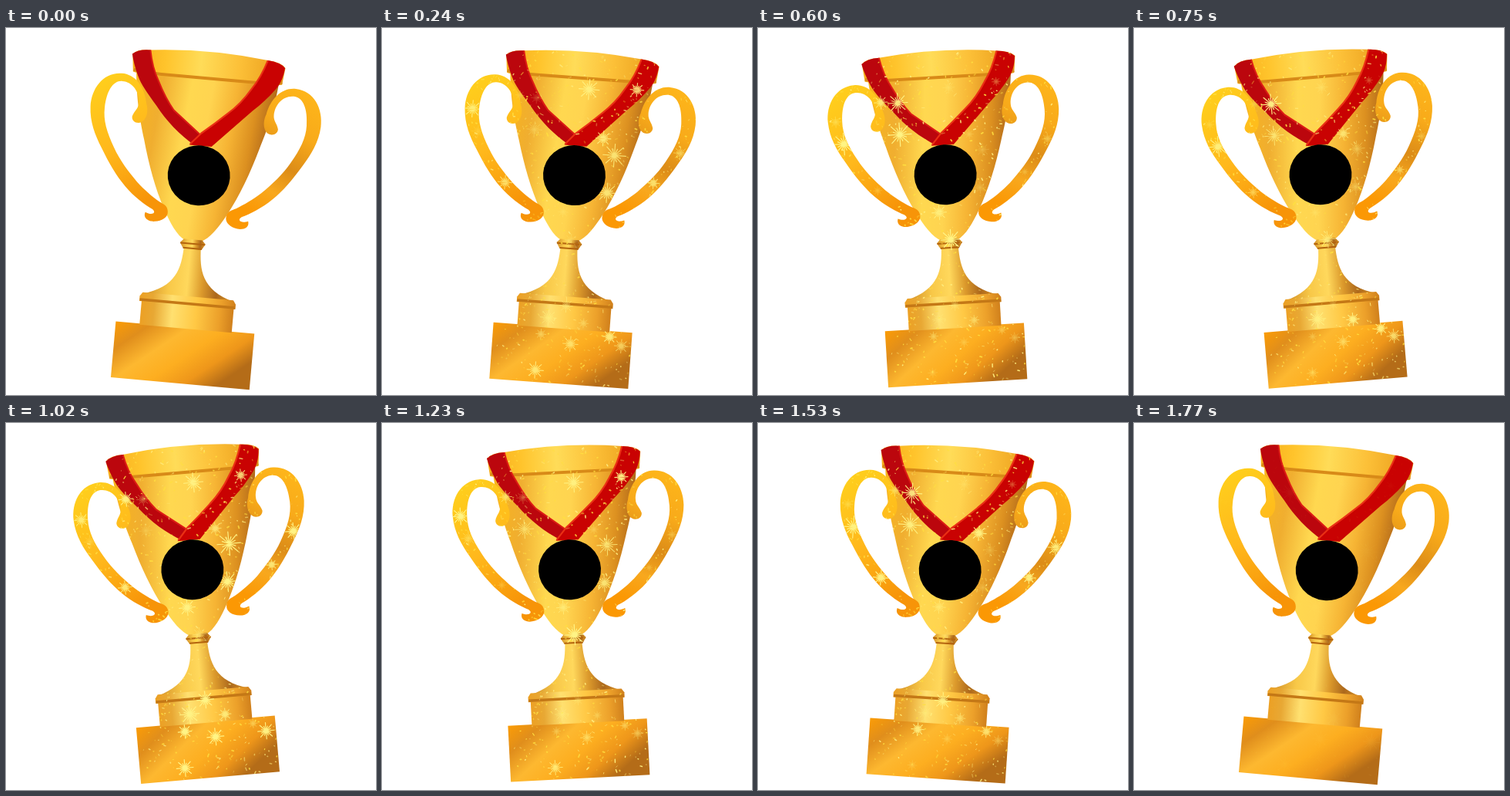
Animation, 480 px wide and 476 px high, one loop 1.8 s. Source, as an HTML page:

```html
<!DOCTYPE html>
<html lang="en">
<head>
<meta charset="utf-8">
<title>Trophy</title>
<style>
html, body { margin: 0; width: 100%; height: 100%; overflow: hidden; background: #fff; }
svg { display: block; width: 100%; height: 100%; }
</style>
</head>
<body>
<svg viewBox="0 0 480 476">
  <defs>
    <linearGradient id="cupFill" gradientTransform="rotate(6)">
      <stop offset="0" stop-color="#f8b41c"/>
      <stop offset=".2" stop-color="#f0ae30"/>
      <stop offset=".4" stop-color="#ffd850"/>
      <stop offset=".55" stop-color="#ffd450"/>
      <stop offset=".72" stop-color="#f6b434"/>
      <stop offset=".87" stop-color="#dc9020"/>
      <stop offset="1" stop-color="#b0681a"/>
    </linearGradient>
    <linearGradient id="rimFill">
      <stop offset="0" stop-color="#f6ac18"/>
      <stop offset=".22" stop-color="#ffc42c"/>
      <stop offset=".45" stop-color="#ffdc58"/>
      <stop offset=".7" stop-color="#fcc038"/>
      <stop offset="1" stop-color="#e89a18"/>
    </linearGradient>
    <linearGradient id="stemFill">
      <stop offset="0" stop-color="#d08c26"/>
      <stop offset=".28" stop-color="#f8c848"/>
      <stop offset=".48" stop-color="#ffd85c"/>
      <stop offset=".64" stop-color="#dc9a2c"/>
      <stop offset=".8" stop-color="#ac681c"/>
      <stop offset="1" stop-color="#e09a28"/>
    </linearGradient>
    <linearGradient id="blockFill">
      <stop offset="0" stop-color="#eca024"/>
      <stop offset=".14" stop-color="#e8a834"/>
      <stop offset=".34" stop-color="#ffe070"/>
      <stop offset=".6" stop-color="#ffc844"/>
      <stop offset=".85" stop-color="#eca02a"/>
      <stop offset="1" stop-color="#d0801c"/>
    </linearGradient>
    <linearGradient id="baseFill" x2="1" y2=".5">
      <stop offset="0" stop-color="#fb9c06"/>
      <stop offset=".2" stop-color="#e08e1c"/>
      <stop offset=".42" stop-color="#fdb830"/>
      <stop offset=".62" stop-color="#fdae20"/>
      <stop offset=".82" stop-color="#ee961a"/>
      <stop offset="1" stop-color="#b46c18"/>
    </linearGradient>
    <linearGradient id="leftFill" x2=".4" y2="1">
      <stop offset="0" stop-color="#ffd21c"/>
      <stop offset=".55" stop-color="#ffb81c"/>
      <stop offset="1" stop-color="#f79408"/>
    </linearGradient>
    <linearGradient id="rightFill" x2=".3" y2="1">
      <stop offset="0" stop-color="#ffb81a"/>
      <stop offset=".35" stop-color="#f8aa1a"/>
      <stop offset=".6" stop-color="#dc8c18"/>
      <stop offset=".8" stop-color="#f8a81e"/>
      <stop offset="1" stop-color="#fb9804"/>
    </linearGradient>
    <path id="handle" d="M162 129.5C172 128 174 114 170 104C166 82 152 67 134.5 67.5C111 68 97 90 98 114C99 134 107 150 117 166C129 186 139 200 152 213C164 225 180 235 190 239.5C196 244 190 248 181 244C178 253 188 256 194 255C204 254 211 248 210 241C209 233 204 232 198 229C188 223 178 216 167 206C154 193 142 180 133 164C122 145 116 130 116.5 114C117 92 124 78 136 77.5C150 77 160 90 160 104C160 112 155 114 153 122C153 127 157 130 162 129.5Z"/>
    <path id="cup" d="M153 60C156 98 163 124 171 150C180 182 191 212 205 238C215 256 224 270 236 276H256C268 270 277 256 287 238C301 212 312 182 321 150C329 124 336 98 339 60Z"/>
    <path id="rim" d="M146.5 41Q152 34 169 34Q246 25 322 34Q340 35 345.5 42L343 64Q330 67 305 66H186Q160 67 149 64Z"/>
    <path id="stem" d="M235 284C234 312 230 338 186 350H306C262 338 258 312 257 284Z"/>
    <path id="knob" d="M234 274H258L262.5 279L258 286.5H234L229.5 279Z"/>
    <path id="plate" d="M187 348H305L308.5 353V359.5H183.5V353Z"/>
    <path id="block" d="M186.5 358H306.5V390H186.5Z"/>
    <path id="base" d="M155.5 388.5H336V461.5H155.5Z"/>
    <path id="ribbonLeft" d="M146 41Q154 34 169 34C172 50 176 61 183 73C190 87 196 97 206 109L244 138L237 152C216 140 198 124 183 105C170 90 161 80 156 69Q149 54 146 41Z"/>
    <path id="ribbonRight" d="M322 34Q338 35 345 42C344 54 341 63 335 71C327 82 318 92 308 101L259 152H230L244 136C256 126 266 117 276 107.5C288 97 297 85 304 73Q315 57 322 34Z"/>
    <clipPath id="outline">
      <use href="#handle"/>
      <use href="#handle" transform="matrix(-1 0 0 1 496 0)"/>
      <use href="#cup"/><use href="#rim"/><use href="#stem"/><use href="#knob"/>
      <use href="#plate"/><use href="#block"/><use href="#base"/>
    </clipPath>
  </defs>
  <g id="trophy">
    <use href="#base" fill="url(#baseFill)"/>
    <use href="#block" fill="url(#blockFill)"/>
    <use href="#stem" fill="url(#stemFill)"/>
    <use href="#plate" fill="url(#blockFill)"/>
    <path d="M184 357.5H308" stroke="#c47816" stroke-width="3.5"/>
    <use href="#cup" fill="url(#cupFill)"/>
    <use href="#knob" fill="url(#stemFill)"/>
    <path d="M230 279.5H262M234 285.5H258" stroke="#b4640e" stroke-width="2"/>
    <use href="#rim" fill="url(#rimFill)"/>
    <path d="M149.5 61Q160 64 186 64H305Q330 64 343 61" fill="none" stroke="#d88a18" stroke-width="4"/>
    <use href="#handle" fill="url(#leftFill)"/>
    <use href="#handle" transform="matrix(-1 0 0 1 496 0)" fill="url(#rightFill)"/>
    <use href="#ribbonLeft" fill="#bb060d"/>
    <path d="M169 34C172 50 176 61 183 73C190 87 196 97 206 109L242 137" fill="none" stroke="#dc1c14" stroke-width="2"/>
    <use href="#ribbonRight" fill="#c90202"/>
    <path d="M322 34Q315 57 304 73C297 85 288 97 276 107.5C266 117 256 126 244 136L231 151" fill="none" stroke="#ea3014" stroke-width="2.2"/>
    <g clip-path="url(#outline)" stroke-linecap="round">
      <g id="glitter"></g>
      <g id="stars" stroke="#fff486"></g>
    </g>
    <ellipse cx="246" cy="190.5" rx="40.5" ry="39" fill="#000"/>
  </g>
</svg>
<script>
const LOOP = 1800, STEP = 30, SWING = 5.1;
const byId = id => document.getElementById(id);
const trophy = byId('trophy'), glitter = byId('glitter'), stars = byId('stars');

let seed = 17;
const random = () => (seed = (seed * 16807) % 2147483647) / 2147483647;

function addPath(parent, d, attrs) {
  const path = document.createElementNS('http://www.w3.org/2000/svg', 'path');
  path.setAttribute('d', d);
  for (const name in attrs) path.setAttribute(name, attrs[name]);
  return parent.appendChild(path);
}

// Tiny streaks, grouped so that each group twinkles together.
function speckPath(count) {
  let d = '';
  for (let i = 0; i < count; i++) {
    const x = 95 + random() * 305, y = 30 + random() * 432;
    const angle = random() * Math.PI, size = 0.4 + random() * random() * 4;
    d += `M${x.toFixed(1)} ${y.toFixed(1)}l${(Math.cos(angle) * size).toFixed(1)} ${(Math.sin(angle) * size).toFixed(1)}`;
  }
  return d;
}
const specks = Array.from({ length: 8 }, (_, i) => addPath(glitter, speckPath(150), {
  stroke: i % 2 ? '#ffe040' : '#ffee80', 'stroke-width': 0.9 + (i % 4) * 0.3
}));

function starPath(radius) {
  let d = '';
  for (let i = 0; i < 8; i++) {
    const reach = radius * (i % 2 ? 0.6 : 1), angle = i * Math.PI / 8;
    const x = Math.cos(angle) * reach, y = Math.sin(angle) * reach;
    d += `M${-x} ${-y}L${x} ${y}`;
  }
  return d;
}
const twinkles = [
  [257, 78, 12], [190, 94, 12], [190, 135, 14], [117, 143, 13], [162, 143, 9],
  [108, 114, 10], [296, 161, 14], [290, 210, 12], [157, 206, 9], [235, 239, 10],
  [248, 275, 12], [248, 360, 10], [226, 377, 12], [272, 381, 8], [257, 409, 10],
  [214, 446, 10], [323, 407, 10], [307, 396, 8], [218, 399, 8], [381, 152, 10],
  [349, 193, 7], [280, 140, 9], [319, 74, 8], [168, 92, 9]
].map(([x, y, radius]) => ({
  x, y, phase: random(), rate: 2 + Math.floor(random() * 2),
  path: addPath(stars, starPath(radius), { 'stroke-width': 1.1 })
}));

const wave = turns => 0.5 + 0.5 * Math.sin(turns * Math.PI * 2);

function ease(s) {
  return s < 0.5 ? (2 * s) ** 2.8 / 2 : 1 - (2 - 2 * s) ** 2.8 / 2;
}

function draw(time) {
  const t = Math.floor((time % LOOP) / STEP) * STEP;
  const fromRest = Math.min(t, LOOP - t);
  const angle = SWING * (1 - 2 * ease(fromRest / (LOOP / 2)));
  trophy.setAttribute('transform', `rotate(${angle} 240 238)`);

  const shine = Math.min(1, Math.max(0, fromRest - 15) / 270);
  specks.forEach((path, i) =>
    path.setAttribute('opacity', shine * (0.35 + 0.6 * wave(3 * t / LOOP + i / 8))));
  twinkles.forEach(({ x, y, phase, rate, path }) => {
    const glow = wave(rate * t / LOOP + phase);
    path.setAttribute('transform', `translate(${x} ${y}) scale(${0.6 + 0.5 * glow})`);
    path.setAttribute('opacity', shine * (0.3 + 0.7 * glow));
  });
}

const start = performance.now();
function tick() {
  draw(performance.now() - start);
  requestAnimationFrame(tick);
}
tick();
</script>
</body>
</html>
```
